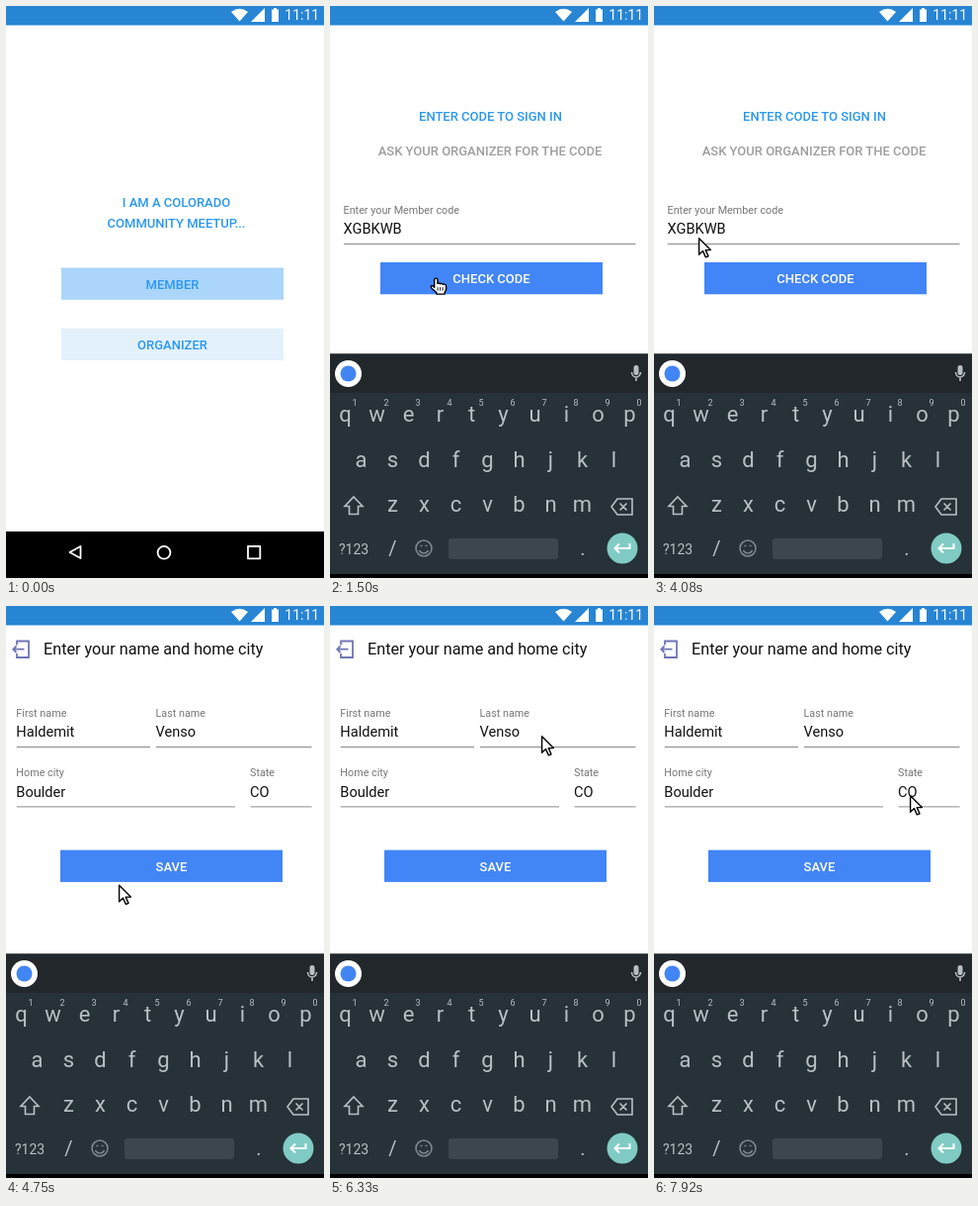
An HTML page that plays this animation: 322 by 578 pixels, repeating every 8000 ms.

```html
<!DOCTYPE html>
<html lang="en">
<head>
<meta charset="utf-8">
<title>Sign-in flow</title>
<style>
  html, body { margin: 0; width: 100%; height: 100%; overflow: hidden; background: #fff; }
  svg { display: block; width: 322px; height: 578px; font-family: Roboto, sans-serif; }
  .mid { text-anchor: middle; }
  .caps { text-anchor: middle; font-size: 13px; font-weight: 500; }
  .label { font-size: 10.8px; fill: #777; }
  .value { font-size: 14.6px; fill: #111; }
  .rule { stroke: #8a8a8a; }
  .icon { fill: none; stroke: #b9c0c4; stroke-width: 1.6; }
  .cursor path { fill: #fff; stroke: #000; stroke-width: 1.4; stroke-linejoin: round; }
</style>
</head>
<body>
<svg viewBox="0 0 322 578">
  <rect width="322" height="578" fill="#fff"/>
  <rect width="322" height="19.5" fill="#2785d4"/>
  <g fill="#fff">
    <path d="M228 6q8.5-6.500 17 0L236.500 15.500z"/>
    <path d="M262 2v14h-14z"/>
    <path d="M269 3.500h2V2h3v1.500h2V16h-7z"/>
    <text x="282.300" y="14" font-size="14">11:11</text>
  </g>

  <g id="role"></g>
  <g id="code"></g>
  <g id="profile"></g>

  <g id="nav">
    <rect y="531" width="322" height="47"/>
    <g fill="none" stroke="#fff" stroke-width="1.8" stroke-linejoin="round">
      <path d="M64.500 552L75.500 546v12z"/>
      <circle cx="160" cy="552.300" r="6.400"/>
      <rect x="245" y="546" width="12.300" height="12.300"/>
    </g>
  </g>
  <g id="keyboard"></g>

  <g id="cursor" class="cursor">
    <path id="arrow" d="M.6 .8V17.200l3.900-3.600 2.900 6.300 2.600-1.100-2.800-6.200h5.200z"/>
    <g id="hand" transform="translate(-5.500 -.3)">
      <path d="M4.200 10.300V2.500a1.600 1.600 0 0 1 3.200 0V6.200q1.600-.9 2.900.3 1.500-.7 2.800.5 2.900-.4 3 2v3.300l-1.500 3v1.600H6.300v-1.600L1.400 11q-1.400-2.200.4-2.700 1.300.1 2.400 2z"/>
      <path d="M7.600 10v3.500M10.100 10v3.500M12.600 10v3.500" style="stroke-width:.9"/>
    </g>
  </g>
</svg>
<script>
const $ = id => document.getElementById(id);
const text = (s, x, y, attrs = '') => `<text x="${x}" y="${y}" ${attrs}>${s}</text>`;
const caps = (s, x, y, fill) => text(s, x, y, `class="caps" fill="${fill}"`);
const rule = (x1, x2, y) => `<path class="rule" d="M${x1} ${y}H${x2}"/>`;
const button = (s, x, y, fill, ink, textX = x + 112.5) =>
  `<rect x="${x}" y="${y}" width="225" height="32.3" fill="${fill}"/>` + caps(s, textX, y + 21, ink);
const field = (label, value, x, end, y) =>
  text(label, x, y, 'class="label"') + text(value, x, y + 20.3, 'class="value"') +
  rule(x + 0.5, end, y + 30.5);

const BLUE = '#2b98f0', ACTION = '#4285f7';

$('role').innerHTML =
  caps('I AM A COLORADO', 172.5, 202.6, BLUE) +
  caps('COMMUNITY MEETUP...', 172.5, 224, BLUE) +
  button('MEMBER', 56, 264.5, '#abd5fa', BLUE) +
  button('ORGANIZER', 56, 325.7, '#e3f1fd', BLUE);

$('code').innerHTML =
  caps('ENTER CODE TO SIGN IN', 162.5, 116.2, BLUE) +
  caps('ASK YOUR ORGANIZER FOR THE CODE', 162, 151.2, '#9e9e9e') +
  field('Enter your Member code', 'XGBKWB', 13.5, 309.5, 210) +
  button('CHECK CODE', 51, 259, ACTION, '#fff');

$('profile').innerHTML =
  `<path d="M11 39.500V35.500H23V52H11V48M18.500 43.700H7.500M10.500 40.500L7.300 43.700 10.500 47"
    fill="none" stroke="#7075b6" stroke-width="1.8"/>` +
  text('Enter your name and home city', 38, 49.2, 'font-size="16.2" fill="#111"') +
  field('First name', 'Haldemit', 10.3, 146, 112) +
  field('Last name', 'Venso', 151.5, 309.5, 112) +
  field('Home city', 'Boulder', 10.3, 232, 172.4) +
  field('State', 'CO', 247, 309.5, 172.4) +
  button('SAVE', 55, 246.6, ACTION, '#fff');

const keyRow = (keys, x, y, size) =>
  [...keys].map((k, i) => text(k, x + 32 * i, y, `class="mid" font-size="${size}"`)).join('');

$('keyboard').innerHTML = `
  <rect y="351.500" width="322" height="222.500" fill="#263238"/>
  <rect y="351.500" width="322" height="39.500" fill="#21272b"/>
  <rect y="574" width="322" height="4"/>
  <circle cx="18.500" cy="371.500" r="13.500" fill="#fff"/>
  <circle cx="18.500" cy="371.500" r="8" fill="#4285f4"/>
  <rect x="307.500" y="363" width="5" height="10" rx="2.500" fill="#b9c0c4"/>
  <path class="icon" d="M305.500 370a4.500 5 0 0 0 9 0M310 375v4"/>
  <g fill="#b9c0c4">
    ${keyRow('qwertyuiop', 15.5, 419.5, 22)}
    ${keyRow('asdfghjkl', 31.5, 465.5, 22)}
    ${keyRow('zxcvbnm', 63.5, 511, 22)}
    ${keyRow('1234567890', 25, 404, 9)}
    ${text('?123', 9, 553.5, 'font-size="14"')}
    ${text('/', 63.5, 555, 'class="mid" font-size="20"')}
    ${text('.', 256, 555, 'class="mid" font-size="20"')}
  </g>
  <path class="icon" d="M24 496L33 505.500H28.500V513.500H19.500V505.500H15z"/>
  <path class="icon" d="M291 498H306V514H291L285 506zM293.500 502.500l7 7m0-7l-7 7"/>
  <g class="icon" style="stroke:#7d878c">
    <circle cx="95" cy="548" r="8"/>
    <path d="M90.500 550a4.800 4.500 0 0 0 9 0M91.500 545.500h2M96.500 545.500h2"/>
  </g>
  <rect x="120" y="538" width="111" height="21" rx="3" fill="#3c474d"/>
  <circle cx="296" cy="548" r="15.500" fill="#80cbc4"/>
  <path class="icon" style="stroke:#fff;stroke-width:2" d="M303.500 543V548H289M293 543.500L288.500 548 293 552.500"/>`;

// Cursor stops: [tick, x, y], twelve ticks per second
const stops = [
  [2, 42, 27], [11, 70, 270], [14, 107, 274.5], [32, 107, 274.5], [33, 98.5, 257], [37, 81, 224],
  [39, 81, 224], [44, 30, 222], [48, 30, 222], [49, 45, 234], [53, 115, 279], [56, 115, 279],
  [57, 114, 281.5], [62, 114, 281.5], [68, 19, 123], [70, 19, 123], [73, 110, 135.5],
  [76, 214, 131], [78, 214, 131], [85, 32, 183.5], [88, 72, 180], [92, 175, 196], [95, 259, 191]
];

function cursorAt(tick) {
  const i = stops.findIndex(s => s[0] >= tick);
  if (i < 1) return stops[0].slice(1);
  const [t0, x0, y0] = stops[i - 1], [t1, x1, y1] = stops[i];
  const k = (tick - t0) / (t1 - t0);
  return [x0 + (x1 - x0) * k, y0 + (y1 - y0) * k];
}

const show = (id, on) => $(id).style.display = on ? '' : 'none';

function draw() {
  const tick = Math.min(95, Math.floor(performance.now() % 8000 * 0.012 + 0.06));
  const [x, y] = cursorAt(tick);
  const overButton = tick < 57 && x > 51 && y > 256;
  show('role', tick < 18);
  show('code', tick >= 18 && tick < 57);
  show('profile', tick >= 57);
  show('nav', tick < 18);
  show('keyboard', tick >= 18);
  show('cursor', tick >= 2);
  show('hand', overButton);
  show('arrow', !overButton);
  $('cursor').setAttribute('transform', `translate(${x} ${y})`);
  requestAnimationFrame(draw);
}
draw();
</script>
</body>
</html>
```
